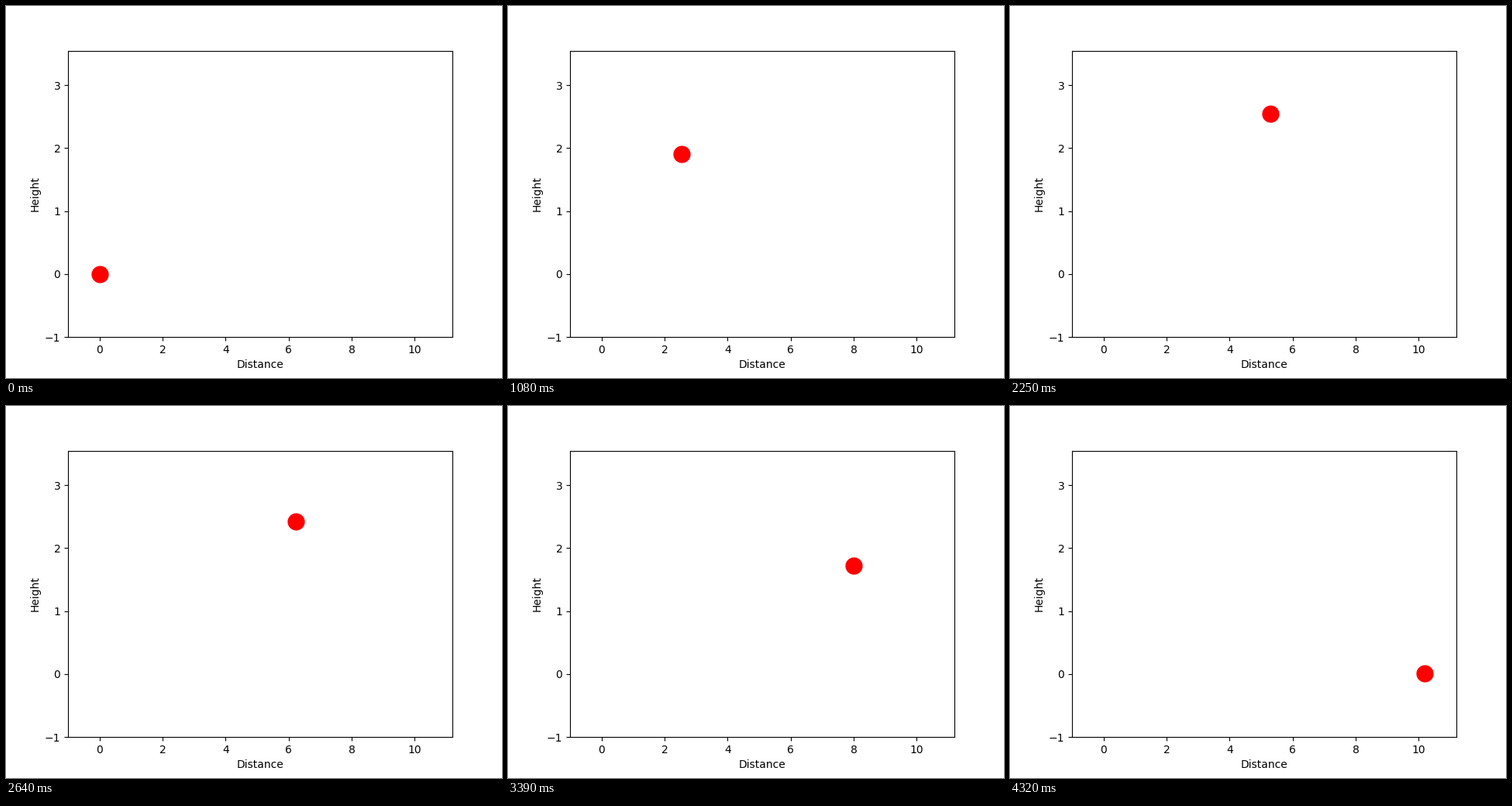
These frames come from a looping animation (640 px wide and 480 px high, 4.35 s). A matplotlib script:

```python
import numpy as np
import matplotlib.pyplot as plt
from matplotlib.animation import FuncAnimation

G = 9.81
SPEED = 10.0
ANGLE = np.radians(45)
DT = 0.01
FRAMES = 145

vx, vy = SPEED * np.cos(ANGLE), SPEED * np.sin(ANGLE)
reach = 2 * vx * vy / G
peak = vy ** 2 / (2 * G)

fig, ax = plt.subplots(figsize=(6.4, 4.8), dpi=100)
ax.set_xlim(-1, reach + 1)
ax.set_ylim(-1, peak + 1)
ax.set_xlabel("Distance")
ax.set_ylabel("Height")
ball, = ax.plot([0], [0], "ro", markersize=15)


def update(i):
    t = i * DT
    ball.set_data([vx * t], [vy * t - G * t ** 2 / 2])
    return ball,


anim = FuncAnimation(fig, update, frames=FRAMES, interval=30,
                     repeat=True, repeat_delay=0)
plt.show()
```
